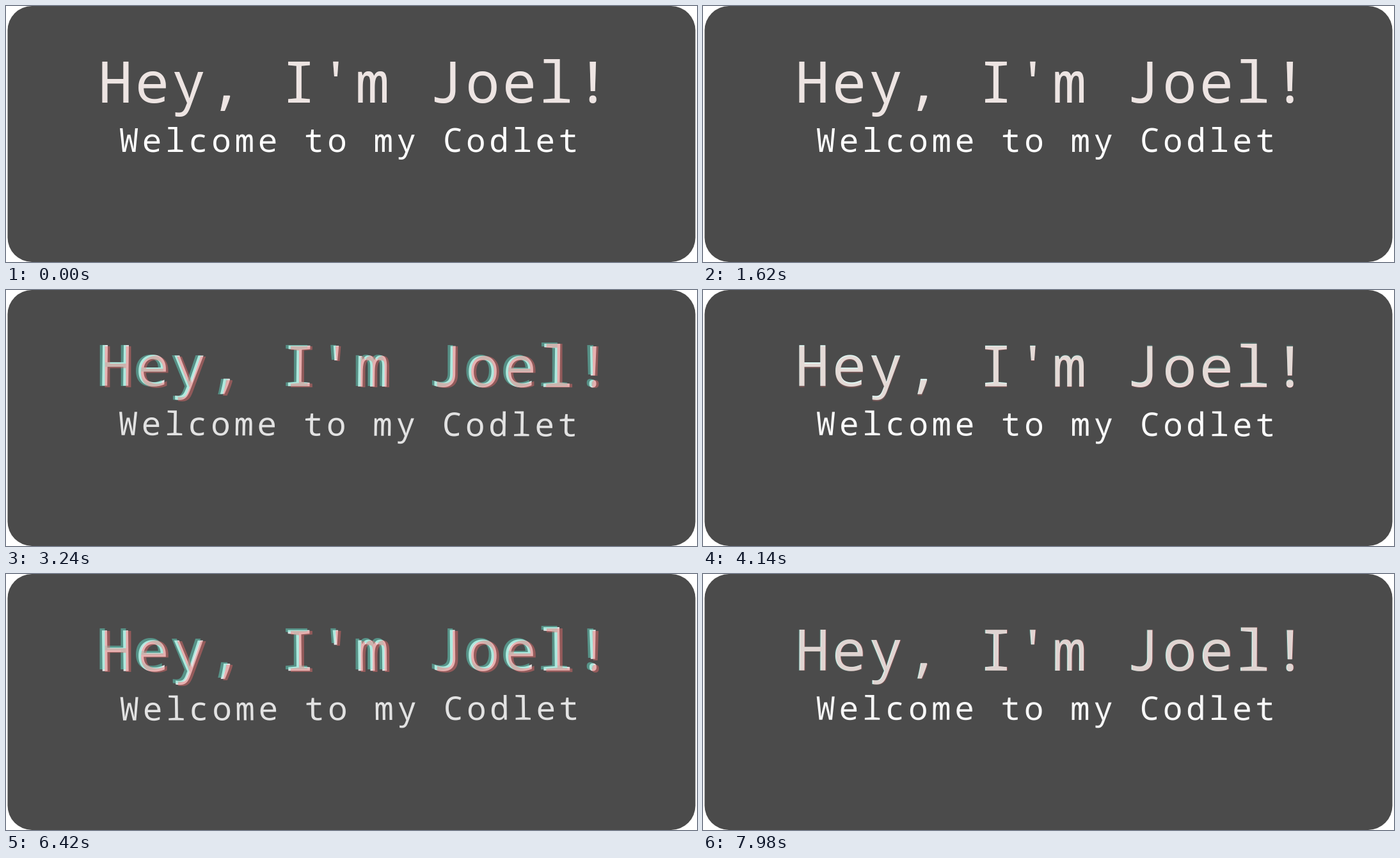
Animation of 1080x400 px, one loop 8 s. Source, as an HTML page:

```html
<!DOCTYPE html>
<html lang="en">
<head>
<meta charset="utf-8">
<title>Welcome banner</title>
<style>
  html, body { margin: 0; width: 100%; height: 100%; overflow: hidden; background: #fff; }
  svg { display: block; width: 1080px; height: 400px; }
  text { font-family: "Noto Sans Mono", "DejaVu Sans Mono", monospace; }
  .title { font-size: 89px; letter-spacing: 4px; }
  .subtitle { font-size: 51px; letter-spacing: 5.56px; }
</style>
</head>
<body>
<svg viewBox="0 0 1080 400">
  <rect x="2.5" width="1075" height="400" rx="38" fill="#4b4b4b"/>
  <g id="main" fill="#fff">
    <text class="title" x="144.3" y="151">Hey, I'm Joel!</text>
    <text class="subtitle" x="176.7" y="228">Welcome to my Codlet</text>
  </g>
  <text id="cyan" class="title" x="144.3" y="151" fill="#67f3da">Hey, I'm Joel!</text>
  <text id="red" class="title" x="144.3" y="151" fill="#f16f6f">Hey, I'm Joel!</text>
</svg>
<script>
const LOOP = 8000, STEP = 60, PERIOD = 4500, DELAY = 636;
const ORIGIN = { x: 660, y: 130 };

// Each burst rises from start to peak and settles at end (percent of the period).
const bursts = [
  { start: 0,  peak: 7,  end: 10, skew: [-0.5, -0.9], shift: [2, 3] },
  { start: 27, peak: 30, end: 35, skew: [0.8, -0.1],  shift: [5, 2] },
  { start: 52, peak: 55, end: 72, skew: [-1, 0.2],    shift: [5, 1] },
  { start: 72, peak: 75, end: 80, skew: [0.4, 1],     shift: [2, 6] }
];

const [main, cyan, red] = ["main", "cyan", "red"].map(id => document.getElementById(id));
const mix = (a, b, k) => a + (b - a) * k;
const slope = degrees => Math.tan(degrees * Math.PI / 180);

// cubic-bezier(.25, .1, .25, 1)
function ease(x) {
  const bezier = (a, b, s) => 3 * a * s * (1 - s) ** 2 + 3 * b * s * s * (1 - s) + s ** 3;
  let low = 0, high = 1;
  for (let i = 0; i < 24; i++) {
    const mid = (low + high) / 2;
    if (bezier(0.25, 0.25, mid) < x) low = mid; else high = mid;
  }
  return bezier(0.1, 1, low);
}

function strength(burst, percent) {
  const { start, peak, end } = burst;
  return percent < peak
    ? ease((percent - start) / (peak - start))
    : 1 - ease((percent - peak) / (end - peak));
}

function setLayer(layer, x, y, opacity) {
  layer.setAttribute("transform", `translate(${x} ${y})`);
  layer.setAttribute("opacity", opacity);
}

function draw(time) {
  const t = Math.floor((time % LOOP) / STEP) * STEP;
  const percent = ((t - DELAY + PERIOD) % PERIOD) / PERIOD * 100;
  const burst = bursts.find(b => percent >= b.start && percent < b.end);
  const k = burst ? strength(burst, percent) : 0;
  const { skew, shift } = burst || bursts[0];

  const a = slope(skew[0] * k), b = slope(skew[1] * k);
  main.setAttribute("transform", `matrix(1 ${b} ${a} 1 ${-a * ORIGIN.y} ${-b * ORIGIN.x})`);
  main.setAttribute("opacity", mix(1, 0.8, k));

  const [dx, dy] = shift.map(v => v * k);
  setLayer(cyan, -dx, -dy, mix(0.11, 0.5, k));
  setLayer(red, dx, dy, mix(0.17, 0.5, k));
}

const begin = performance.now();
function tick() {
  draw(performance.now() - begin);
  requestAnimationFrame(tick);
}
draw(0);
requestAnimationFrame(tick);
</script>
</body>
</html>
```
